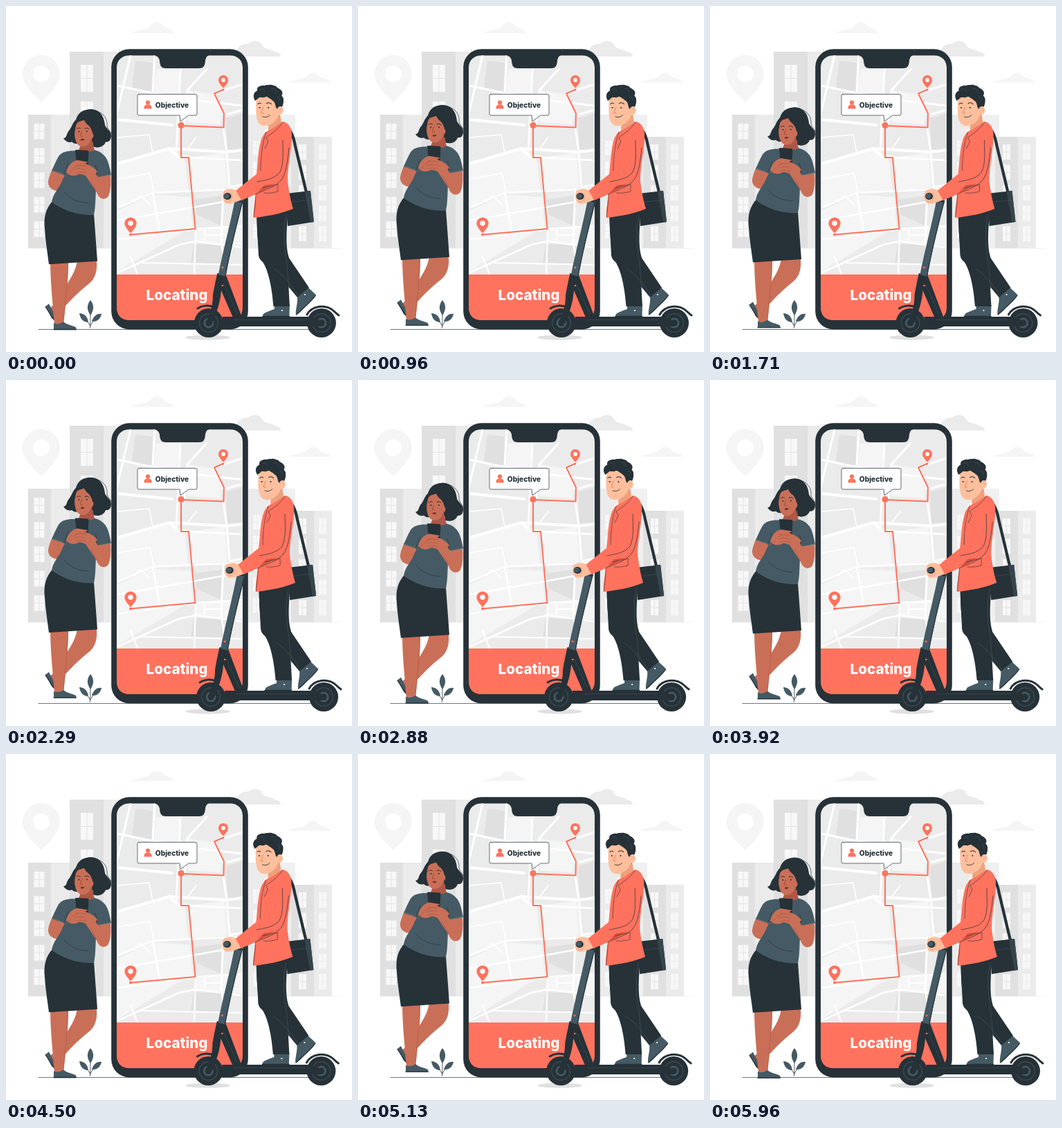
Write an HTML page with a canvas that moves like this. It is 500x500 px and loops after 6000 ms.

```html
<!DOCTYPE html>
<html lang="en">
<head>
<meta charset="utf-8">
<title>Locating</title>
<style>
html, body { margin: 0; width: 100%; height: 100%; overflow: hidden; background: #fff; }
canvas { display: block; width: 500px; height: 500px; }
</style>
</head>
<body>
<canvas id="stage"></canvas>
<script>
const canvas = document.getElementById('stage');
const scale = Math.max(1, window.devicePixelRatio || 1);
canvas.width = canvas.height = 500 * scale;
const c = canvas.getContext('2d');

const CORAL = '#ff725e', DARK = '#263238', SLATE = '#455a64', RING = '#3b4a52';
const BROWN = '#ca6f57', BROWN_DK = '#ad5848', PEACH = '#ffbf9d', PEACH_DK = '#f0a07c';
const G1 = '#f5f5f5', G2 = '#ebebeb', G3 = '#e0e0e0';

function fill(d, color) {
  c.fillStyle = color;
  c.fill(new Path2D(d));
}
function line(d, color, width) {
  c.strokeStyle = color;
  c.lineWidth = width;
  c.stroke(new Path2D(d));
}
function box(x, y, w, h, color) {
  c.fillStyle = color;
  c.fillRect(x, y, w, h);
}
function oval(x, y, rx, ry, color) {
  c.fillStyle = color;
  c.beginPath();
  c.ellipse(x, y, rx, ry, 0, 0, 7);
  c.fill();
}
const dot = (x, y, r, color) => oval(x, y, r, r, color);

function pin(x, y, r, tip, hole, color, inner) {
  fill(`M${x - r} ${y}A${r} ${r} 0 0 1 ${x + r} ${y}C${x + r} ${y + r * 0.62} ${x + r * 0.3} ${tip - r * 0.3} ${x} ${tip}C${x - r * 0.3} ${tip - r * 0.3} ${x - r} ${y + r * 0.62} ${x - r} ${y}Z`, color);
  dot(x, y, hole, inner);
}
function pane(x, y, w, h, bar) {
  box(x, y, w, h, '#f7f7f7');
  line(`M${x + w / 2} ${y}v${h}M${x} ${y + h / 2}h${w}`, bar, 0.8);
}

function city() {
  fill('M181 39C184 36 190 37 194 35C199 32 205 34 208 29C212 23 224 22 228 29C231 33 241 33 243 39Z', G1);
  fill('M322 73C325 66 333 65 336 60C340 53 348 56 352 53C359 48 368 51 371 58C375 64 384 61 388 66C393 66 397 69 397 73Z', G2);
  fill('M409 111C412 107 419 108 424 105C429 105 432 104 436 100C441 95 449 96 453 102C457 106 466 104 469 111Z', G1);
  pin(51, 98, 27, 139, 12, G1, '#fff');

  box(92, 66, 49, 284, G3);
  box(141, 66, 20, 284, G2);
  pane(108, 85, 18, 39, G3);
  pane(108, 138, 18, 39, G3);
  box(32, 157, 33, 193, G3);
  box(65, 157, 27, 193, G2);
  for (let i = 0; i < 5; i++) pane(40.5, 170 + i * 35.3, 15, 22.5, G3);

  box(350, 157, 34, 193, G2);
  box(384, 157, 34, 193, '#f0f0f0');
  for (let i = 0; i < 5; i++) pane(357, 195 + i * 30, 11, 21, G2);
  box(412, 189, 33, 161, G3);
  box(445, 189, 26, 161, G2);
  for (let i = 0; i < 5; i++) {
    pane(423, 200 + i * 29.5, 11, 22, G3);
    pane(452, 200 + i * 29.5, 11, 22, G2);
  }
  line('M32 350.3H484', G2, 0.7);
  line('M47 467.4H452', DARK, 0.7);
}

function map() {
  box(160, 71, 182, 318, G2);
  fill('M160 228L238 206L258 219L264 268L212 270L160 292Z', G1);
  fill('M160 296L212 272L266 276L270 321L250 330L160 384Z', G1);
  fill('M217 91L250 92L248 126L214 127Z', G1);
  fill('M264 122L300 128L312 156L310 171L262 168Z', G1);
  fill('M265 219L316 212L320 262L268 268Z', G1);
  fill('M276 323L342 318V346L274 342Z', G1);
  fill('M187 79L212 82L210 126L182 119Z', G3);
  fill('M318 162L342 155V210L320 207Z', G3);
  fill('M270 280L312 274L310 317L276 302Z', G3);
  fill('M271 344L316 346L313 372L267 372Z', G3);
  line('M180 71L160 156M215 71L212 128M160 115L252 134L342 144M252 90L246 214', '#fff', 3);
  line('M160 164L240 172M160 228L236 206L318 211L342 208M236 206L248 218L266 219', '#fff', 4);
  line('M290 91L262 122L258 172M314 176L319 211L323 262L342 258M342 150L315 158L300 127L342 113', '#fff', 3);
  line('M160 292L212 270L342 264M266 219L342 223M160 310L264 292L342 278', '#fff', 2.6);
  line('M212 270L222 324M274 322L342 318M314 264L311 340L316 372M160 386L250 345L274 340L342 349', '#fff', 2.6);
  line('M160 338L274 323L272 388M196 371L342 374M190 388L180 362M287 321V338M290 331H312V320', '#fff', 2.2);
  line('M160 190L207 186L212 213M186 283L194 274L208 287M160 250L208 242L214 270M275 190L262 207', '#fff', 1.6);
}

function phone() {
  c.fillStyle = DARK;
  c.beginPath();
  c.roundRect(152.2, 62.3, 197.6, 405, 26);
  c.fill();
  c.save();
  c.clip(new Path2D('M178 71.5H213C218 71.5 221 74 222 79C222.4 87 225 90 231 90H279C285 90 287.5 87 288 79C289 74 290 71.5 295 71.5H324C335 71.5 342 79 342 89V436C342 447 335 454 324 454H178C167 454 160 447 160 436V89C160 79 167 71.5 178 71.5Z'));
  map();
  box(160, 388, 182, 67, CORAL);
  c.restore();
  c.fillStyle = '#fff';
  c.textAlign = 'center';
  c.font = '800 20.6px Inter, sans-serif';
  c.fillText('Locating', 247, 425);

  line('M314 121L301 126.5L315 155.5L314.5 175.5L253 173V219H264L273.5 322L180 330.5', CORAL, 2);
  dot(253, 172.5, 4.6, CORAL);
  dot(180, 330.5, 2, CORAL);
  dot(314, 121, 1.6, CORAL);
  pin(180, 314, 8.6, 328, 3.7, CORAL, '#fff');
  pin(314, 107, 7, 118.5, 3, CORAL, '#fff');

  const tip = 'M192 127.5H274Q276 127.5 276 129.5V156Q276 158 274 158H264L252 166.5L251 158H192Q190 158 190 156V129.5Q190 127.5 192 127.5Z';
  fill(tip, '#fff');
  line(tip, DARK, 0.7);
  dot(205, 139.6, 3.1, CORAL);
  fill('M199.4 148.4C199.4 144.6 201.4 142.8 203 142.6H207C209 143 210.7 144.8 210.7 148.4Z', CORAL);
  c.fillStyle = DARK;
  c.font = '800 10.2px Inter, sans-serif';
  c.fillText('Objective', 240, 147);
}

function plant() {
  line('M121.5 465C122 455 122 448 122 436M121.5 462C118 456 115 452 111 448M122 462C125 456 128 452 134 448', DARK, 0.8);
  fill('M122 425C128 432 127 440 122 447C117 440 116 432 122 425Z', SLATE);
  fill('M106 444C113 444 118 449 119 457C111 457 107 451 106 444Z', SLATE);
  fill('M138 445C131 444 126 449 124 456C132 457 137 451 138 445Z', SLATE);
}

function woman() {
  // legs
  fill('M103 368L130.5 366C133 381 129 394 120 401C106 412 97 421 88 431L68 448L61 438C72 430 78 422 85 408C91 395 100 386 103 368Z', BROWN);
  fill('M57 434L62 430L71 447L70 454L66 451Z', SLATE);
  line('M57 434.5L69.5 453.5', DARK, 1.2);
  fill('M64 368H90C90 394 87 424 83 459H70C68 434 64 400 64 368Z', BROWN);
  line('M89.5 372C89 398 86 425 83 456', BROWN_DK, 0.7);
  fill('M69 458C74 460 79 459 83 456C89 461 96 461 101 464Q102 466 101 467.5H69Z', SLATE);
  line('M69 467.2H101.5', DARK, 1.4);

  // hair behind the face
  fill('M101 164C104 153 113 148.5 124 149C135 150 141 158 142 170C145 178 152 180 152 187C152 194 148 197 144 196C142 203 133 206 126 203L108 196C104 200 98 199 95 196C90 198 86 195 83 191C88 190 87 186 90 181C95 176 95 170 101 164Z', DARK);
  line('M132 152C142 155 147 164 146 173C147 178 150 179 152 184M101 165C96 170 98 176 92 180', DARK, 0.7);

  // far forearm
  fill('M67 235L85 241L82 249L97 235L106 243L78 266C69 269 60 262 61 253C62 247 64 242 67 235Z', BROWN);
  // skirt
  fill('M67 282C58 292 54 304 56 322C57 340 60 357 62 373L132 368.5L127 300Z', DARK);
  // shirt
  fill('M97 209C88 209 80 211 76 217C72 224 69 231 66 238L84 244L82 250C78 262 68 270 66 283C82 295 104 303 127 301.5C130 289 129 272 131 249L152 244C150 234 148 223 143 217C138 211 133 209 126 207.5Z', SLATE);
  line('M83 244C86 238 88 234 89 228M131 248C132 241 131 235 129 230M84 268C92 278 104 284 119 284', DARK, 0.6);
  line('M66.3 237L84 243.4M131 248L151.8 243', '#6d7f87', 0.8);
  // neck and face
  fill('M108 194L126 190C126 198 126 203 128 208C121 212 112 212 104 209C107 205 108 201 108 194Z', BROWN_DK);
  fill('M102 168C100 177 98 184 100 191C101 198 105 203 111 203C118 203 122 197 124 190L126 178L118 163Z', BROWN);
  fill('M99 174C101 159 110 149 124 149C136 150 142 160 143 172L142 195C135 204 127 201 124 194C127 187 125 179 120 173C116 170 114 167 112 163C107 164 103 168 99 174Z', DARK);
  oval(124, 187, 2.4, 3.6, BROWN);
  dot(105.4, 181.2, 1, DARK);
  dot(116.8, 181, 1, DARK);
  line('M102 177.5C104 175.5 106 175.7 107.5 176.8M114 176.8C116 175.5 118 176 119.7 177.5', DARK, 1);
  line('M109.5 181C108.5 184 107.6 186 107.6 187.5L110.5 188.4', '#8c4034', 0.8);
  fill('M107.6 193C109 190.6 111 191.8 113.5 191.8C113 194.8 109.5 195.5 107.6 193Z', '#7b352f');

  // phone and hands
  fill('M133 247L151 244.5C152 258 151 270 147 276C141 281 134 278 131 269L113 242L122 232Z', BROWN);
  fill('M100 208.5Q100 207.5 101 207.5L118 208.5Q119.5 208.6 119.5 210L118 238H103Z', DARK);
  fill('M87 240C89 231 95 224 103 222.5L118 225C117 228 110 228 105 229L116 230.5C119 234 117 238 114 239L105 243C99 246 92 246 87 240Z', BROWN);
  fill('M101 231C106 227 113 226 118 229C124 231 129 235 132 239L125 247C116 246 110 242 102 242C99 240 103 238 108 238L100 236Z', BROWN);
  line('M101 231.5C106 229 111 230 116 231M100 236C105 234 110 235 114 236M102 241C107 239 111 240 115 241M97 235L104 229', BROWN_DK, 0.8);
  line('M82 249L95 237M131 268L122 251', BROWN_DK, 0.7);
}

function wheel(x, y) {
  dot(x, y, 21, DARK);
  dot(x, y, 14, RING);
  dot(x, y, 12.6, DARK);
  dot(x, y, 7.5, SLATE);
  dot(x, y, 4.8, DARK);
}

function scooter() {
  line('M277 437C284 432.5 294 431.5 302 436', DARK, 3);
  wheel(293, 458);
  wheel(456, 458);
  line('M435 446C442 433 462 430 474 441Q478 445 481 447', DARK, 3);
  fill('M313 449H440L452 453L456 463H322C316 462 312 456 313 449Z', DARK);
  line('M330 453.5H434', RING, 0.7);
  // fork and brace
  fill('M305.5 386L318 389L341 450H328L311 411C310 425 307 437 298 459L289 457C297 441 299 430 299 418C301 406 303 397 305.5 386Z', DARK);
  line('M315 402L334 444', RING, 0.8);
  fill('M331 279L343 281C337 303 325 350 317.6 391L307 388C314 352 325 312 331 279Z', SLATE);
  line('M342 281C336.5 303 324.5 350 317 390', DARK, 1.2);
  dot(313, 378, 1.4, CORAL);
  dot(313, 404, 1.3, CORAL);
  line('M320 275L339 281', DARK, 5);
}

function man() {
  // bag
  line('M403 174C411 178 415 186 418 202L434 269', DARK, 4.2);
  fill('M405 271L440 267L445 312L407 318Z', DARK);
  fill('M432 268L440 267L445 312L440 312.8Z', '#36454c');
  line('M406 284L441.5 280', SLATE, 0.5);

  // trousers and shoes
  fill('M421 420L437 407C440 410 444 413 447.5 417C447 422 438 429 431 436C427 441 422 446 419 445.5C418 439 422 430 421 420Z', SLATE);
  line('M447.5 418C442 427 428 438 419.5 446', DARK, 1.4);
  fill('M388 432H410L409.5 448.5H371C371 443 378 442 388 438Z', SLATE);
  line('M371 448.4H409.5', DARK, 1.4);
  dot(432, 417, 1.1, '#fff');
  dot(399, 440, 1.1, '#fff');
  fill('M362 300L408 292C406 320 403 345 409 364L438 407L421 421L397 392L386 378C374 372 366 369 365 360Z', DARK);
  fill('M363 300L405 295C400 328 407 362 410 434L386.5 434C384 400 377 375 368 366C364 345 362 322 363 300Z', DARK);
  line('M405 302C400 322 402 350 406 372C407 385 408 396 409 408M387 380C397 384 410 400 422 418', SLATE, 0.6);

  scooter();

  // neck, shirt, jacket
  fill('M374 180C380 176 391 171 398 165L402 172L388 189L370 203Z', '#fff');
  fill('M380 166L396 156L398 168C393 175 385 179 379 180Z', PEACH_DK);
  fill('M375 182L385 177L400 167C407 168 412 174 413 184C414 204 407 230 407 252C409 270 412 283 415 293C398 300 378 304 358 306C357 294 360 282 361 272L340 281L332 267L362 243C364 227 364 205 370 190Z', CORAL);
  line('M376 183C371 195 368 218 368 238M400 168C392 180 384 184 376 190L379 196L374 206', DARK, 0.6);
  line('M400 194C400 210 402 228 396 240C388 251 371 252 363 254M409 205C407 224 405 242 398 251C390 262 372 266 361 272', DARK, 0.7);
  fill('M361 272L389 257L373 259Z', '#d9503f');
  line('M371 263L393 258V268C386 270 379 271 373 270M361 272C361 284 359 296 358 305', DARK, 0.6);

  // hand
  fill('M332 266C326 263 317 264 314 268C312 275 313 283 318 285.5C323 287 330 284 340 280.5Z', PEACH);
  oval(320, 275, 5.6, 5, DARK);
  oval(319, 274.6, 4, 3.6, SLATE);
  line('M325 270C328 273 328 277 325 280M317 282C321 284 324 282 326 280', PEACH_DK, 0.9);

  // head
  fill('M362 132C361 145 361 156 363 164C365 171 370 174 376 173C385 172 391 166 394 157L394 130L376 124Z', PEACH);
  oval(396, 151, 4.8, 6, PEACH);
  line('M394.5 149C397 147 399 149 398 152', PEACH_DK, 0.8);
  fill('M360 137C356 130 358 124 364 122C364 116 371 113 376 116C380 112 388 114 391 118C397 119 400 124 398 129C402 133 402 140 399 146C397 144 393 145 392 149C389 147 390 141 387 138C383 135 380 131 376 131C371 134 366 130 364 134Z', DARK);
  for (const [x, y, r] of [[362, 130, 4], [368, 121, 5.2], [377, 119.5, 5.5], [387, 121, 6], [394, 126, 5.5], [396, 135, 5], [383, 129, 5]])
    dot(x, y, r, DARK);
  line('M367 121C370 118 374 120 373 124M383 120C387 118 391 121 390 125M392 131C395 131 397 134 395 137', SLATE, 0.6);
  dot(366.6, 147, 1.1, DARK);
  dot(379.3, 147, 1.1, DARK);
  line('M363.8 141.6C365.3 140 367 140 368.5 141M376.5 141C378.5 139.4 381.5 139.6 383.5 141.6', DARK, 1.1);
  line('M372 146C371 150 369 153 369 154.4L372 155.2', '#d97b5e', 0.9);
  line('M371 159.8C375 161.5 379 160.5 381.5 157.5', DARK, 0.9);
}

const SHAKE = [0, -1, 2, -4, 4, -4, 4, -4, 2, -1, 0];
function shake(t) {
  const p = t / 0.6 % 10, i = Math.floor(p);
  return SHAKE[i] + (SHAKE[i + 1] - SHAKE[i]) * (p - i);
}
function float(t) {
  const p = t / 0.75 % 2;
  return -10 * Math.min(p, 2 - p);
}

function moved(x, y, draw) {
  c.save();
  c.translate(x, y);
  draw();
  c.restore();
}

function frame(now) {
  const step = Math.floor((now % 6000 + 5) * 24 / 1000) + 1;
  const t = (step % 144) / 24;
  c.setTransform(scale, 0, 0, scale, 0, 0);
  c.lineCap = c.lineJoin = 'round';
  box(0, 0, 500, 500, '#fff');
  city();
  phone();
  plant();
  oval(291.5, 479, 32, 3.6, G3);
  moved(0, 0.8 + float(t), woman);
  moved(shake(t), 0, man);
}

let start;
function loop(now) {
  if (start === undefined) start = now;
  frame(Math.max(0, now - start));
  requestAnimationFrame(loop);
}
frame(0);
requestAnimationFrame(loop);
</script>
</body>
</html>
```
